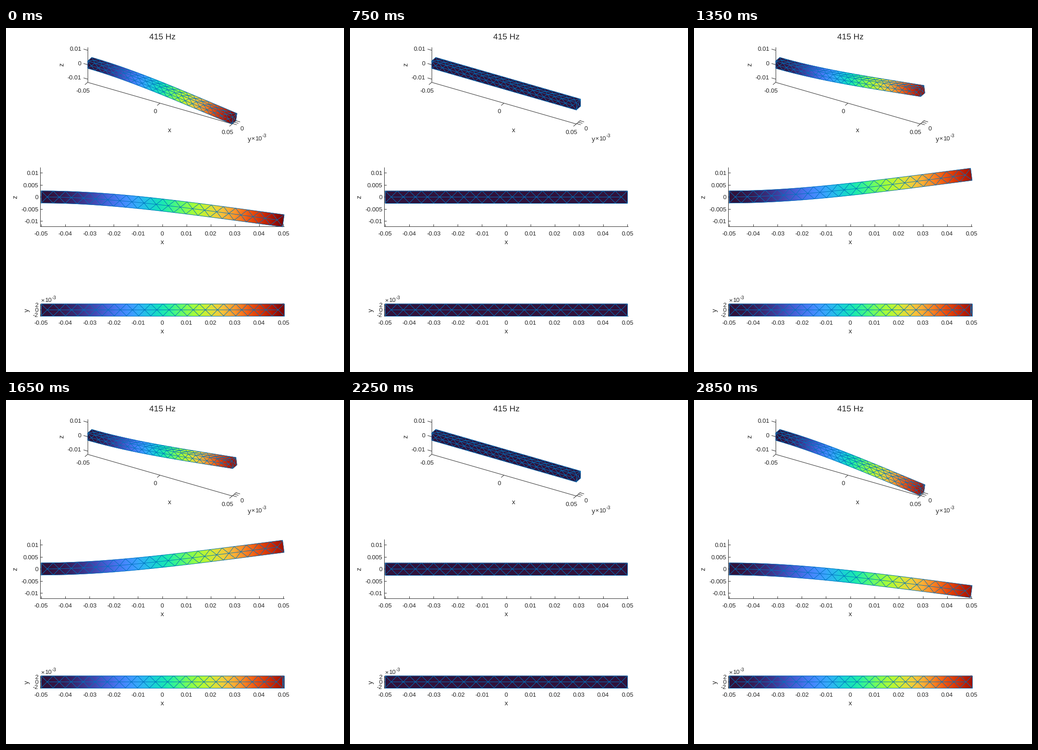
These frames come from a looping animation (741x756 px, 3000 ms). A matplotlib script:

```python
import numpy as np
import matplotlib.pyplot as plt
from matplotlib.animation import FuncAnimation
from matplotlib.collections import LineCollection

W, H, DPI = 741, 756, 100
FRAMES, STEP_MS = 20, 150
HALF_L, HALF_H, CELL = 0.05, 0.0025, 0.005
AMP, Z_LIM = 0.00985, 0.01225
INK, EDGE = "#262626", "#0072BD"
PT = 72 / DPI  # points per pixel

plt.rcParams["font.family"] = "Liberation Sans"
plt.rcParams["text.hinting"] = "none"
fig = plt.figure(figsize=(W / DPI, H / DPI), dpi=DPI, facecolor="white")
ax = fig.add_axes([0, 0, 1, 1])
ax.set_xlim(0, W)
ax.set_ylim(H, 0)
ax.axis("off")


# --- projections from beam coordinates to pixels ---
def side_view(x, y, z):
    return 342.5 + 5310 * x, 371.3 - 5310 * z


def top_view(x, y, z):
    return 342.5 + 5310 * x, 619.4 - 5310 * y


def oblique_view(x, y, z):
    scale, c, s = 3660, np.cos(np.pi / 6), 0.5
    dx, dy = x + HALF_L, y + HALF_H
    px = 179 + scale * (c * dx + s * dy)
    py = 80.6 + scale * (s * (s * dx - c * dy) - c * z)
    return px, py


# --- first bending mode of a clamped beam ---
BETA, SIGMA = 1.8751, 0.7341


def bend(x, z, phase):
    b = BETA * (x + HALF_L) / (2 * HALF_L)
    shape = np.cosh(b) - np.cos(b) - SIGMA * (np.sinh(b) - np.sin(b))
    slope = np.sinh(b) + np.sin(b) - SIGMA * (np.cosh(b) - np.cos(b))
    w = AMP * phase * shape / 2
    u = -z * AMP * phase * slope / 2 * BETA / (2 * HALF_L)
    return u, w


VMAX = np.hypot(*bend(HALF_L, HALF_H, 1))


# --- faces map (p, q) to a point on the beam surface ---
def front(p, q):
    return p, 0 * p - HALF_H, q


def top(p, q):
    return p, q, 0 * p + HALF_H


def tip(p, q):
    return 0 * p + HALF_L, p, q


def long_edges():
    n = round(2 * HALF_L / CELL)
    xs = -HALF_L + CELL * np.arange(n + 1)
    mids = xs[:-1] + CELL / 2
    segs = [[(x, -HALF_H), (x, HALF_H)] for x in (-HALF_L, HALF_L)]
    segs += [[(a, 0), (b, 0)] for a, b in zip(mids, mids[1:])]
    for a, b, m in zip(xs, xs[1:], mids):
        for q in (-HALF_H, HALF_H):
            segs += [[(a, q), (b, q)], [(a, q), (m, 0)], [(m, 0), (b, q)]]
    return np.array(segs)


def tip_edges():
    h = HALF_H
    ring = [(-h, -h), (h, -h), (h, h), (-h, h)]
    segs = [[ring[i], ring[(i + 1) % 4]] for i in range(4)]
    return np.array(segs + [[c, (0, 0)] for c in ring])


LONG_EDGES, TIP_EDGES = long_edges(), tip_edges()
LONG_GRID = np.meshgrid(np.linspace(-HALF_L, HALF_L, 121),
                        np.linspace(-HALF_H, HALF_H, 3))
TIP_GRID = np.meshgrid(*[np.linspace(-HALF_H, HALF_H, 3)] * 2)

PATCHES = [(oblique_view, top), (oblique_view, front), (oblique_view, tip),
           (side_view, front), (top_view, tip), (top_view, top)]


def draw_face(view, face, phase, order):
    def place(p, q):
        x, y, z = face(p, q)
        u, w = bend(x, z, phase)
        return *view(x + u, y, z + w), np.hypot(u, w)

    grid, edges = (TIP_GRID, TIP_EDGES) if face is tip else (LONG_GRID, LONG_EDGES)
    px, py, size = place(*grid)
    mesh = ax.pcolormesh(px, py, size, cmap="turbo", vmin=0, vmax=VMAX,
                         shading="gouraud", zorder=order)
    ex, ey, _ = place(edges[..., 0], edges[..., 1])
    lines = LineCollection(np.stack([ex, ey], -1), colors=EDGE,
                           linewidths=PT, zorder=order + 0.5)
    ax.add_collection(lines, autolim=False)
    return [mesh, lines]


# --- fixed axes and labels ---
def line(*pts):
    xs, ys = zip(*pts)
    ax.plot(xs, ys, color=INK, lw=PT, solid_capstyle="butt", zorder=1)


def tick(x, y, dx, dy):
    line((x, y), (x + dx, y + dy))


def number(x, y, s, ha="center", px=13.33):
    ax.text(x, y + 0.35 * px, s, ha=ha, va="baseline", fontsize=px * PT,
            color=INK, zorder=1)


def name(x, y, s, rotation=0):
    ax.text(x, y, s, ha="center", va="center", rotation=rotation,
            fontsize=14.67 * PT, color=INK, zorder=1)


def exponent(x, y):
    number(x, y, "×", "left")
    number(x + 9.5, y, "10", "left")
    number(x + 24.5, y - 5.5, "-3", "left", 10.7)


def draw_oblique_axes():
    x0, x1 = -HALF_L, HALF_L
    y0, y1 = -HALF_H, HALF_H
    line(oblique_view(x0, y0, Z_LIM), oblique_view(x0, y0, -Z_LIM))
    line(oblique_view(x0, y0, -Z_LIM), oblique_view(x1, y0, -Z_LIM),
         oblique_view(x1, y1, -Z_LIM))
    for z, s in ((0.01, "0.01"), (0, "0"), (-0.01, "-0.01")):
        px, py = oblique_view(x0, y0, z)
        tick(px, py, -9, -2.6)
        number(165, py - 3.7, s, "right")
    for x, s in ((x0, "-0.05"), (0, "0"), (x1, "0.05")):
        px, py = oblique_view(x, y0, -Z_LIM)
        tick(px, py, -6, 5.2)
        number(px - 10, py + 17.5, s)
    for y in (-0.002, 0, 0.002):
        tick(*oblique_view(x1, y, -Z_LIM), 9, 2.6)
    number(517.5, 220, "0")
    name(358, 225, "x")
    name(534, 246, "y")
    name(123, 80.5, "z", 90)
    exponent(537.5, 242)


def draw_flat_axes():
    left, right = 75, 609.5
    line((left, 306), (left, 436), (right, 436))
    for z, s in ((0.01, "0.01"), (0.005, "0.005"), (0, "0"),
                 (-0.005, "-0.005"), (-0.01, "-0.01")):
        py = side_view(0, 0, z)[1]
        tick(left, py, 5, 0)
        number(71, py, s, "right")
    line((left, 606), (left, 633), (right, 633))
    for y in (2, 0, -2):
        py = top_view(0, y / 1000, 0)[1]
        tick(left, py, 5, 0)
        number(70.5, py, str(y), "right")
    for i in range(-5, 6):
        px = side_view(i / 100, 0, 0)[0]
        s = f"{i / 100:.2f}" if i else "0"
        for base, row in ((436, 451), (633, 647)):
            tick(px, base, 0, -5)
            number(px, row, s)
    name(342.5, 471, "x")
    name(342.5, 667, "x")
    name(21, 371.5, "z", 90)
    name(46.5, 620, "y", 90)
    exponent(76, 597.5)


number(342.5, 18, "415 Hz", px=18.3)
draw_oblique_axes()
draw_flat_axes()
beam = []


def update(i):
    while beam:
        beam.pop().remove()
    phase = -np.cos(2 * np.pi * i / FRAMES)
    for k, (view, face) in enumerate(PATCHES):
        beam.extend(draw_face(view, face, phase, 2 + k))
    ax.set_xlim(0, W)
    ax.set_ylim(H, 0)
    return beam


anim = FuncAnimation(fig, update, frames=FRAMES, interval=STEP_MS,
                     init_func=lambda: [], repeat=True, repeat_delay=0)
plt.show()
```
